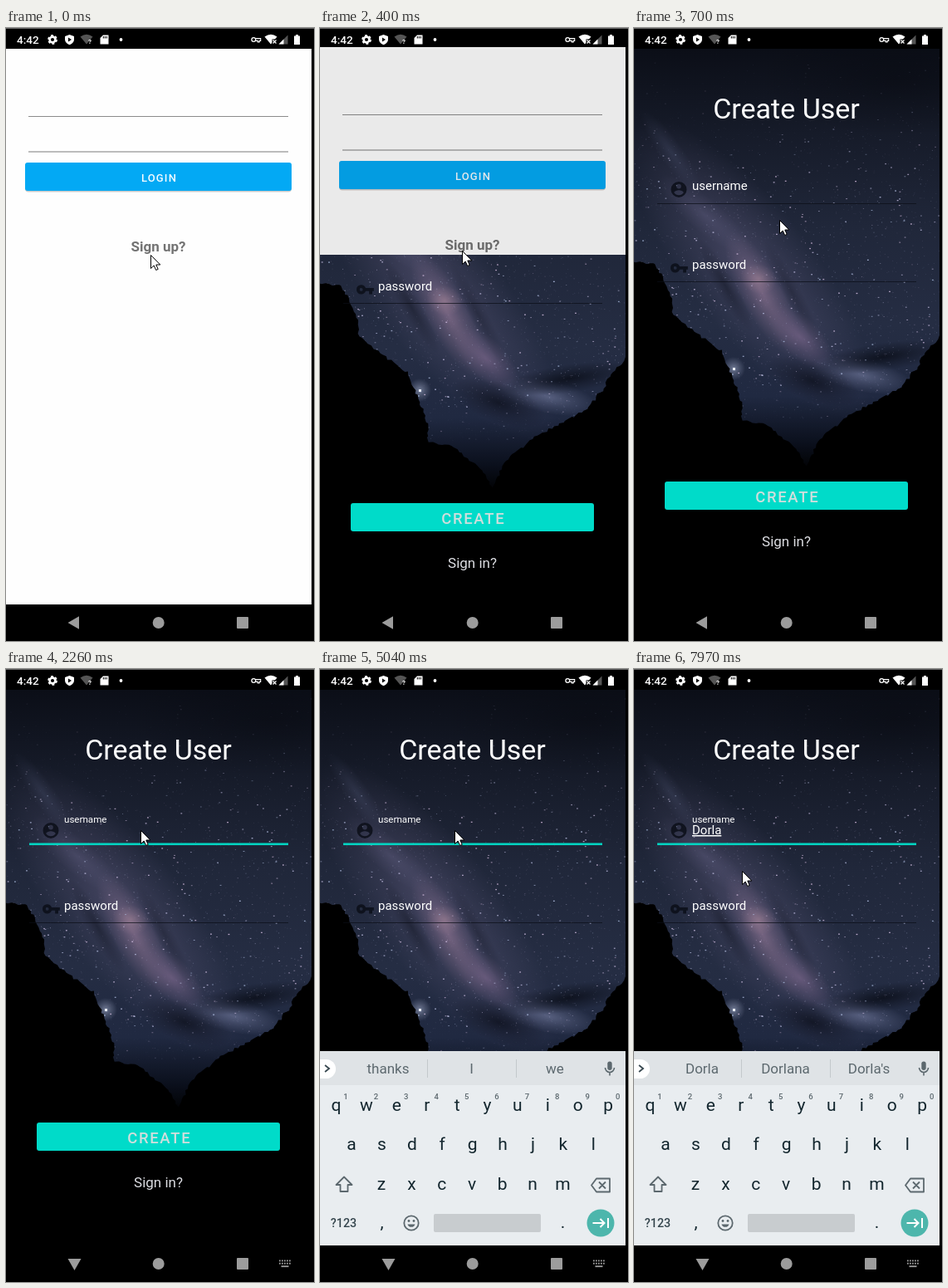
An HTML page with a canvas for the animation above (8000 ms loop, 371 by 738 pixels).

```html
<!DOCTYPE html>
<html lang="en">
<head>
<meta charset="utf-8">
<title>Create user</title>
<style>
html, body { margin: 0; width: 100%; height: 100%; overflow: hidden; background: #000; }
#stage { position: relative; width: 371px; height: 738px; overflow: hidden; background: #000; }
#stage > *, #create > * { position: absolute; left: 0; top: 0; width: 371px; height: 738px; }
text { font-family: Roboto, sans-serif; white-space: pre; }
</style>
</head>
<body>
<div id="stage">
  <svg id="login"></svg>
  <div id="create"><canvas id="sky" width="371" height="738"></canvas><svg id="form"></svg></div>
  <svg id="keyboard"></svg>
  <svg id="chrome"></svg>
</div>
<script>
const LOOP = 8000;
const $ = id => document.getElementById(id);
const text = (x, y, size, str, fill, attrs = 'text-anchor="middle"') =>
  `<text x="${x}" y="${y}" font-size="${size}" fill="${fill}" ${attrs}>${str}</text>`;
const rect = (x, y, w, h, fill, attrs = '') =>
  `<rect x="${x}" y="${y}" width="${w}" height="${h}" fill="${fill}" ${attrs}/>`;
const path = (d, attrs) => `<path d="${d}" ${attrs}/>`;
const stroke = (color, width) => `fill="none" stroke="${color}" stroke-width="${width}"`;
const KEY = 'M12.65 10C11.8 7.7 9.6 6 7 6a6 6 0 0 0 0 12c2.6 0 4.8-1.7 5.65-4H17v4h4v-4h2v-4zM7 14a2 2 0 1 1 0-4 2 2 0 0 1 0 4z';
const PERSON = 'M12 2a10 10 0 1 0 0 20 10 10 0 0 0 0-20zm0 3a3 3 0 1 1 0 6 3 3 0 0 1 0-6zm0 14.2c-2.5 0-4.7-1.3-6-3.2 0-2 4-3.1 6-3.1s6 1.1 6 3.1c-1.3 1.9-3.5 3.2-6 3.2z';

$('login').innerHTML =
  rect(0, 25, 368, 669, '#fefefe') +
  rect(27, 106, 313, 1, '#8c8c8c') + rect(27, 148.5, 313, 1, '#7c7c7c') +
  rect(23, 163, 321, 34.5, '#000', 'rx="4" opacity=".2"') +
  rect(23, 162, 321, 34, '#03a9f4', 'rx="3"') +
  text(184.5, 184.5, 13, 'LOGIN', '#f4fbff', 'text-anchor="middle" font-weight="500" letter-spacing="1.15"') +
  text(183.5, 268.5, 17, 'Sign up?', '#737373', 'text-anchor="middle" font-weight="700"') +
  rect(0, 0, 371, 738, '#000', 'id="dim" opacity="0"');

$('form').innerHTML =
  text(183.5, 108.5, 34, 'Create User', '#fff') +
  path(PERSON, 'transform="translate(42.6 183) scale(.95)" fill="#0a0e17" opacity=".85"') +
  path(KEY, 'transform="translate(43 277.5) scale(.95)" fill="#0a0e17" opacity=".85"') +
  rect(28, 211, 312, 1, '#0a0d16', 'opacity=".7"') + rect(28, 305, 312, 1, '#0a0d16', 'opacity=".7"') +
  rect(28, 209.5, 312, 2.6, '#03d5c2', 'id="line"') +
  text(70, 195, 15, 'username', '#fff', 'id="label"') +
  text(70, 289.5, 15, 'password', '#fff', '') +
  text(70, 199, 15, '', '#fff', 'id="typed" text-decoration="underline"') +
  rect(70, 187, 2, 16, '#03d5c2', 'id="caret"') +
  rect(37, 546, 293, 34, '#00dbc9', 'rx="3"') +
  text(184.8, 570.8, 18.5, 'CREATE', '#cfdedc', 'text-anchor="middle" font-weight="500" letter-spacing="1.65"') +
  text(183.5, 624, 17, 'Sign in?', '#dcdde2');

const INK = '#13262e', GREY = '#5c686e';
const keyRow = (letters, x0, y) => [...letters].map((c, i) => text(x0 + i * 36.4, y, 21, c, INK)).join('');
$('keyboard').innerHTML =
  rect(0, 460, 368, 234, '#e9edf0') + rect(0, 460, 368, 41, '#dfe3e6') +
  rect(-12, 470, 31, 23, '#fff', 'rx="11.5"') +
  path('M6 477l5 4-5 4', stroke('#37474f', 1.8)) +
  rect(129, 470, 1, 22, '#c3c9cc') + rect(236, 470, 1, 22, '#c3c9cc') +
  [82, 182.5, 283].map(x => text(x, 487, 17, '', GREY, 'class="hint" text-anchor="middle"')).join('') +
  rect(346.3, 472.5, 5.4, 10.5, GREY, 'rx="2.7"') +
  path('M343.5 480a5.5 5.5 0 0 0 11 0M349 485.5v4', stroke(GREY, 1.6)) +
  keyRow('qwertyuiop', 19.5, 532) + keyRow('asdfghjkl', 38, 579) + keyRow('zxcvbnm', 74, 626.5) +
  [...'1234567890'].map((c, i) => text(31 + i * 36.4, 517.5, 9.5, c, GREY, 'text-anchor="middle" font-weight="500"')).join('') +
  path('M29 611.5l-9.5 9.5h5v8h9v-8h5z', stroke(GREY, 1.8) + ' stroke-linejoin="round"') +
  path('M327 621.5l6-8h16v16h-16zM336 617.5l8 8m0-8l-8 8', stroke(GREY, 1.8) + ' stroke-linejoin="round"') +
  text(28.5, 672, 14.3, '?123', '#37474f', 'text-anchor="middle" font-weight="500"') +
  text(74.5, 673, 21, ',', INK) + text(292.5, 673, 21, '.', INK) +
  `<circle cx="110" cy="667" r="8.7" ${stroke(GREY, 1.8)}/>` +
  `<circle cx="107" cy="664.5" r="1.4" fill="${GREY}"/><circle cx="113" cy="664.5" r="1.4" fill="${GREY}"/>` +
  path('M105.5 668.5a4.7 4.7 0 0 0 9 0z', `fill="${GREY}"`) +
  rect(137, 656, 129, 22, '#c8cccf', 'rx="2"') +
  '<circle cx="338" cy="667" r="16.5" fill="#4db6ac"/>' +
  path('M328.5 667h14m-5-5l5 5-5 5M347 661v12', stroke('#fff', 2));

const NAV = '#9c9c9c';
const wifi = (x, fill) => path(`M${x - 7.5} 10.5q7.5-5.5 15 0L${x} 19.5z`, `fill="${fill}"`);
const keyDots = [0, 1, 2, 3, 4].map(i =>
  rect(329 + i * 3, 711.5, 1.8, 1.8, NAV) + rect(329 + i * 3, 714.8, 1.8, 1.8, NAV)).join('');
$('chrome').innerHTML =
  rect(0, 0, 371, 1, '#666') +
  text(13, 19, 13.5, '4:42', '#fff', 'font-weight="500"') +
  `<circle cx="56" cy="14" r="3.4" ${stroke('#fff', 2.6)}/>` +
  `<circle cx="56" cy="14" r="5" ${stroke('#fff', 1.8)} stroke-dasharray="2.8 2.436"/>` +
  path('M76.500 8l5.500 2v4c0 3-2.500 5-5.500 6.300-3-1.300-5.500-3.300-5.500-6.300v-4z', 'fill="#fff"') +
  path('M75 11.500v5l4-2.500z', 'fill="#000"') +
  wifi(97, '#555') + text(101, 19, 8, '?', '#fff', 'text-anchor="middle" font-weight="700"') +
  path('M117 8.500h6.500v11h-10v-7.500z', 'fill="#fff"') +
  path('M117.300 10v2.500m2-2.500v2.500m2-2.500v2.500', stroke('#000', 1)) +
  '<circle cx="138.500" cy="14" r="1.900" fill="#fff"/>' +
  `<circle cx="298.300" cy="14" r="2.400" ${stroke('#fff', 1.3)}/>` +
  path('M300.700 12.600h6v2.800h-1.500v1.500h-2v-1.500h-2.500', stroke('#fff', 1.1)) +
  wifi(319, '#fff') + rect(320.5, 13.5, 7, 7, '#000') +
  path('M321.500 14.500l4 4m0-4l-4 4', stroke('#fff', 1.2)) +
  path('M339.500 8.500v11h-11z', 'fill="#555"') + path('M334.500 13.500v6h-6z', 'fill="#fff"') +
  path('M347 9.500h2v-1.500h3v1.500h2v10.500h-7z', 'fill="#fff"') +
  path('', `id="back" fill="${NAV}"`) +
  `<circle cx="183.700" cy="716" r="7" fill="${NAV}"/>` + rect(278, 709, 14, 14, NAV, 'rx="1"') +
  `<g id="imeIcon">${keyDots}${rect(331.5, 718.3, 9, 1.8, NAV)}</g>` +
  path('M.5.5v16l3.700-3.500 2.500 5.500 2.500-1.100-2.400-5.400h5z', 'id="pointer" fill="#fff" stroke="#000" stroke-width="1"');

function seeded(seed) {
  return () => (seed = (seed * 16807) % 2147483647) / 2147483647;
}

function paintSky() {
  const c = $('sky').getContext('2d'), rnd = seeded(4242);
  const base = c.createLinearGradient(0, 25, 0, 535);
  [[0, '#0b0e17'], [.2, '#161b29'], [.42, '#20273a'], [.65, '#252d43'], [.82, '#202941'], [.93, '#0b101d'], [1, '#000']]
    .forEach(([p, color]) => base.addColorStop(p, color));
  c.fillStyle = base;
  c.fillRect(0, 0, 368, 738);

  // soft ellipse: centre, radii, tilt in degrees, colour, strength
  const glow = (x, y, rx, ry, tilt, rgb, alpha) => {
    c.save();
    c.translate(x, y);
    c.rotate(tilt * Math.PI / 180);
    c.scale(rx, ry);
    const g = c.createRadialGradient(0, 0, 0, 0, 0, 1);
    g.addColorStop(0, `rgba(${rgb},${alpha})`);
    g.addColorStop(.5, `rgba(${rgb},${alpha * .45})`);
    g.addColorStop(1, `rgba(${rgb},0)`);
    c.fillStyle = g;
    c.fillRect(-1, -1, 2, 2);
    c.restore();
  };
  glow(140, 290, 220, 75, 52, '112,104,142', .45);
  glow(155, 320, 85, 26, 62, '165,130,160', .5);
  glow(200, 372, 50, 24, 45, '150,120,160', .5);
  glow(150, 302, 22, 18, 20, '190,150,165', .4);
  glow(85, 225, 70, 20, 40, '105,102,138', .35);
  glow(45, 150, 60, 14, 55, '80,88,120', .3);
  glow(275, 418, 62, 20, 12, '120,128,165', .6);
  glow(120, 410, 14, 14, 0, '190,200,230', .5);
  glow(110, 310, 65, 12, 60, '14,18,30', .45);
  glow(190, 318, 70, 11, 62, '20,24,38', .4);
  glow(300, 396, 80, 17, -8, '8,11,20', .75);
  glow(215, 425, 60, 24, 20, '10,13,24', .7);
  glow(320, 60, 170, 70, 0, '6,8,14', .4);

  const spread = 440;
  for (let i = 0; i < 2600; i++) {
    const x = rnd() * 368, y = 30 + Math.pow(rnd(), .75) * spread;
    const fade = Math.min(1, Math.max(.15, (y - 60) / 130)) * (y > 430 ? .4 : 1);
    const bright = Math.pow(rnd(), 5);
    c.fillStyle = `rgba(${175 + rnd() * 50 | 0},195,230,${fade * (.1 + bright * .75)})`;
    c.fillRect(x, y, bright > .5 ? 1.8 : 1, bright > .8 ? 1.3 : 1);
  }
  c.fillStyle = '#e8edff';
  c.fillRect(119, 409, 3, 3);

  // jagged outline through a few points
  const ridge = points => {
    c.beginPath();
    points.forEach(([x, y], i) => {
      if (!i) return c.moveTo(x, y);
      const [px, py] = points[i - 1], n = Math.ceil(Math.hypot(x - px, y - py) / 4);
      for (let k = 1; k <= n; k++)
        c.lineTo(px + (x - px) * k / n + (rnd() - .5) * 3, py + (y - py) * k / n + (rnd() - .5) * 3);
    });
    c.fill();
  };
  c.fillStyle = '#000';
  ridge([[-5, 282], [24, 283], [32, 297], [44, 318], [47, 346], [73, 366], [106, 389], [116, 413],
    [126, 440], [131, 455], [130, 472], [158, 477], [196, 506], [214, 540], [214, 745], [-5, 745]]);
  ridge([[373, 366], [352, 389], [340, 410], [322, 432], [296, 447], [262, 464], [238, 483],
    [222, 498], [204, 535], [204, 745], [373, 745]]);
  c.fillRect(0, 535, 371, 203);
  c.fillRect(0, 0, 371, 25);
  c.fillRect(368, 0, 3, 738);
}

// Rows start with the time from which they hold.
const POINTER = [[0, 174, 273], [120, 171, 268], [550, 174, 250], [700, 175, 231], [820, 168, 212],
  [960, 164, 198], [1090, 162, 194], [7110, 157, 172], [7250, 146, 153], [7390, 134, 190],
  [7540, 130, 228], [7820, 130, 237], [7970, 130, 243]];
// create offset, reveal edge, login offset, dim
const OPENING = [[0, 0, 738, 0, 0], [400, 26, 273, -2, .08], [550, 4, 0, -13, .1], [700, 0, 0, 0, 0]];
// label size, label baseline, underline width
const FOCUS = [[0, 15, 195, 0], [1650, 13.2, 189.5, 190], [1770, 11.6, 185, 312]];
const CARET = [[0, 0], [1370, 1], [2140, 0], [2540, 1], [2970, 0], [3530, 1], [4080, 0], [4510, 1],
  [5040, 0], [5470, 1], [7390, 0]];
const TYPED = [[0, ''], [5750, 'D'], [5890, 'Do'], [6040, 'Dor'], [6180, 'Dorl'], [6820, 'Dorla']];
const HINTS = [[0, 'thanks', 'I', 'we'], [5750, 'D', 'Do', 'Day'], [5890, 'Do', "Don't", 'Does'],
  [6040, 'Dor', 'Door', 'Dorm'], [6320, 'Dorl', 'Dorla', 'Dorlana'], [6820, 'Dorla', 'Dorlana', "Dorla's"]];

const at = (table, t) => table.findLast(row => row[0] <= t).slice(1);
const set = (id, attrs) => Object.entries(attrs).forEach(([k, v]) => $(id).setAttribute(k, v));
const show = (id, on) => { $(id).style.visibility = on ? 'visible' : 'hidden'; };

function render(t) {
  const [shift, edge, loginShift, dim] = at(OPENING, t);
  $('create').style.transform = `translateY(${shift}px)`;
  $('create').style.clipPath = `inset(${Math.max(0, edge - shift)}px 0 0 0)`;
  $('login').style.transform = `translateY(${loginShift}px)`;
  set('dim', { opacity: dim });

  const [size, base, width] = at(FOCUS, t);
  set('label', { 'font-size': size, y: base });
  set('line', { x: 184 - width / 2, width });

  const [word] = at(TYPED, t);
  $('typed').textContent = word;
  set('caret', { x: 70 + (word ? $('typed').getComputedTextLength() : 0) });
  $('caret').setAttribute('opacity', at(CARET, t)[0]);

  const hints = at(HINTS, t);
  document.querySelectorAll('.hint').forEach((el, i) => { el.textContent = hints[i]; });
  show('keyboard', t >= 2540);
  show('imeIcon', t >= 2260);
  set('back', { d: t >= 2260 ? 'M74.5 710h16l-8 14z' : 'M74.500 716l13.500-7.800v15.600z' });

  const [x, y] = at(POINTER, t);
  set('pointer', { transform: `translate(${x} ${y})` });
}

paintSky();
const start = performance.now();
function tick() {
  render((performance.now() - start) % LOOP);
  requestAnimationFrame(tick);
}
tick();
</script>
</body>
</html>
```
